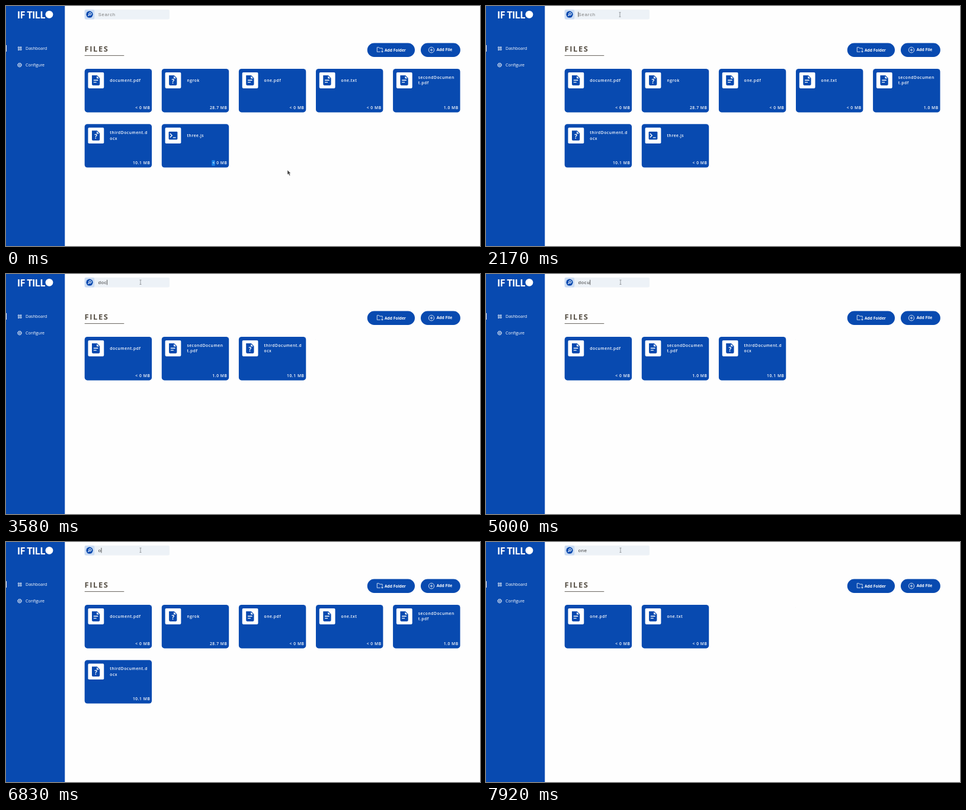
An HTML page for the animation above (8000 ms loop, 800 by 405 pixels).

```html
<!DOCTYPE html>
<html lang="en">
<head>
<meta charset="utf-8">
<title>Files</title>
<style>
  html, body { margin: 0; width: 100%; height: 100%; overflow: hidden; background: #fefefe; }
  svg { display: block; width: 100vw; height: 100vh; }
  text { font-family: "Open Sans", "Noto Sans", sans-serif; fill: #fff; white-space: pre; }
  .blue { fill: #084ab0; }
  .line { fill: none; stroke: #fff; stroke-width: .8; }
  .brand { font-size: 16.5px; font-weight: 700; font-stretch: 75%; letter-spacing: -.8px; }
  .nav { font-size: 7.05px; }
  .head { font-size: 13px; font-weight: 700; letter-spacing: 1.6px; fill: #575046; }
  .button { font-size: 6.7px; font-weight: 700; }
  .card { font-size: 6.65px; font-weight: 600; letter-spacing: .58px; }
  .size { text-anchor: end; }
  .mark { font-size: 10px; font-weight: 700; letter-spacing: 0; text-anchor: middle; }
  .field { font-family: "Liberation Sans", Arial, sans-serif; font-size: 7.7px; letter-spacing: .8px; }
</style>
</head>
<body>
<svg viewBox="0 0 800 405" preserveAspectRatio="none">
  <defs>
    <g id="page">
      <path class="blue" d="M6.5 5h8.7l4.6 4.6V20a1.8 1.8 0 0 1-1.8 1.8H8.3A1.8 1.8 0 0 1 6.5 20z"/>
      <path fill="#fff" d="M14.6 6.2v4h4z"/>
    </g>
    <g id="doc">
      <use href="#page"/>
      <path class="line" stroke-width="1.3" d="M9.3 13.2h7.6M9.3 16.5h4.9" style="stroke-width:1.4"/>
    </g>
    <g id="unknown">
      <use href="#page"/>
      <text class="mark" x="13.2" y="19.2">?</text>
    </g>
    <g id="code">
      <rect class="blue" x="6" y="6.6" width="14.8" height="13.6" rx="1.4"/>
      <path class="line" style="stroke-width:1.4" d="M8.4 10l3.2 3.2-3.2 3.2M13.2 16.8h4.8"/>
    </g>
  </defs>

  <rect width="800" height="405" fill="#fefefe"/>

  <rect class="blue" width="99.3" height="405"/>
  <text class="brand" x="18.8" y="20.7">IF TILL</text>
  <circle cx="73" cy="14.3" r="6.4" fill="#fff"/>
  <rect y="66" width="1" height="11" fill="#fff"/>
  <path class="line" d="M20.5 69h2v2.6h-2zM24 69h2v1.4h-2zM20.5 73.2h2v1.2h-2zM24 71.9h2v2.5h-2z"/>
  <text class="nav" x="33" y="74">Dashboard</text>
  <g class="line">
    <circle cx="23" cy="99.6" r="2.9"/>
    <circle cx="23" cy="99.6" r="1.1"/>
    <circle cx="23" cy="99.6" r="3.4" stroke-dasharray="1.3 1.37"/>
  </g>
  <text class="nav" x="33" y="102">Configure</text>

  <rect x="132.7" y="6" width="143.3" height="16.6" rx="2.5" fill="#edf2f7"/>
  <rect x="132.7" y="6" width="16.6" height="16.6" rx="2.5" fill="#cbdcf3"/>
  <circle class="blue" cx="141" cy="14.2" r="5.6"/>
  <circle class="line" cx="141.9" cy="13.3" r="2" style="stroke-width:1.1"/>
  <path class="line" d="M140.4 14.8l-2.1 2.1" style="stroke-width:1.2"/>
  <text class="field" id="query" x="155.7" y="17"></text>
  <rect id="caret" y="9.8" width=".8" height="8.6" fill="#333"/>

  <text class="head" x="132.4" y="77">FILES</text>
  <rect x="132.7" y="83.1" width="66.6" height="1" fill="#67625b"/>

  <rect class="blue" x="609.8" y="62.6" width="80.2" height="23.3" rx="11.6"/>
  <path class="line" d="M631.8 77.3h-5.5v-7.5h3.2l1 1.4h4.7v3.2M633.2 76.8h3.6M635 75v3.6"/>
  <text class="button" x="639" y="76.6">Add Folder</text>
  <rect class="blue" x="700" y="62.6" width="66.8" height="23.3" rx="11.6"/>
  <circle class="line" cx="718" cy="74.2" r="4.7"/>
  <path class="line" d="M715.5 74.2h5M718 71.7v5"/>
  <text class="button" x="726.7" y="76.4">Add File</text>

  <g id="cards"></g>

  <path id="arrow" d="M0 0v7.6l1.8-1.5 1.5 3.1 1.4-.7-1.4-3 2.2-.3z" fill="#444" stroke="#fff" stroke-width=".3"/>
  <path id="beam" d="M-1.5-3.7h3M0-3.7v7.4M-1.5 3.7h3" fill="none" stroke="#8b8f94" stroke-width=".9"/>
</svg>
<script>
const LOOP = 8000;
const $ = id => document.getElementById(id);

// name ("|" marks the line break), size, icon
const files = [
  ['document.pdf', '< 0 MB', 'doc'],
  ['ngrok', '28.7 MB', 'unknown'],
  ['one.pdf', '< 0 MB', 'doc'],
  ['one.txt', '< 0 MB', 'doc'],
  ['secondDocumen|t.pdf', '1.0 MB', 'doc'],
  ['thirdDocument.d|ocx', '10.1 MB', 'unknown'],
  ['three.js', '< 0 MB', 'code']
];

// time, query, caret shown
const typing = [
  [0, '', 0], [1580, '', 1], [2250, '', 0],
  [2830, 'd', 1], [3170, 'do', 1], [3580, 'doc', 1], [3830, 'docu', 1],
  [4500, 'docu', 0], [5000, 'docu', 1], [5420, 'doc', 1], [5580, 'do', 1],
  [5920, 'd', 1], [6000, 'd', 0], [6250, '', 1],
  [6830, 'o', 1], [7170, 'on', 1], [7330, 'one', 1], [7920, 'one', 0]
];

// time, x, y, pointer shape
const pointer = [
  [0, 475, 277, 'arrow'], [330, 560, 220, 'arrow'], [410, 690, 150, 'arrow'],
  [500, 757, 98, 'arrow'], [580, 695, 54, 'arrow'], [670, 560, 40, 'arrow'],
  [750, 410, 39, 'arrow'], [830, 270, 56, 'arrow'], [920, 176, 70, 'arrow'],
  [1000, 258, 50, 'arrow'], [1080, 470, 70, 'arrow'], [1170, 699, 104, 'arrow'],
  [1250, 590, 122, 'arrow'], [1330, 360, 64, 'arrow'], [1420, 223.6, 15.5, 'beam'],
  [1830, 0, 0, ''], [2000, 224.2, 15.5, 'beam'], [2080, 225, 15, 'beam'],
  [2170, 226, 14.5, 'beam'], [2250, 226.5, 14.2, 'beam'], [2420, 227, 13.8, 'beam']
];

const cards = files.map(([name, size, icon]) => {
  const g = document.createElementNS('http://www.w3.org/2000/svg', 'g');
  const lines = name.split('|');
  const first = lines.length > 1 ? 17.2 : 21.8;
  const selected = icon === 'code'
    ? '<rect class="selection" x="84.6" y="61" width="5.2" height="9.3" fill="#1b86ea"/>' : '';
  g.innerHTML = `
    <rect class="blue" width="113.4" height="73.4" rx="4.6"/>
    <rect x="5.8" y="6.1" width="26.8" height="26.8" rx="1.8" fill="#fff"/>
    <use href="#${icon}" x="5.8" y="6.1"/>${selected}
    ${lines.map((s, i) => `<text class="card" x="42.6" y="${first + i * 9.2}">${s}</text>`).join('')}
    <text class="card size" x="110.7" y="67.6">${size.replace('<', '&lt;')}</text>`;
  $('cards').append(g);
  return { g, key: name.replace('|', '').toLowerCase() };
});
const selection = document.querySelector('.selection');

const show = (el, on) => el.setAttribute('visibility', on ? 'visible' : 'hidden');
const move = (el, x, y) => el.setAttribute('transform', `translate(${x} ${y})`);
const at = (steps, t) => steps.findLast(s => s[0] <= t);

function draw(t) {
  const [, query, caret] = at(typing, t);
  const label = $('query');
  label.textContent = query || 'Search';
  label.style.fill = query ? '#333' : '#7b7b7b';
  $('caret').setAttribute('x', 155.5 + (query ? label.getComputedTextLength() : 0));
  show($('caret'), caret);

  let slot = 0;
  for (const { g, key } of cards) {
    const match = key.includes(query);
    g.style.display = match ? '' : 'none';
    if (!match) continue;
    move(g, 132.7 + slot % 5 * 130.1, 106 + Math.floor(slot / 5) * 93.2);
    slot++;
  }
  show(selection, t < 1580);

  const [, x, y, shape] = at(pointer, t);
  for (const id of ['arrow', 'beam']) {
    show($(id), id === shape);
    move($(id), x, y);
  }
}

const start = performance.now();
function tick() {
  draw((performance.now() - start) % LOOP);
  requestAnimationFrame(tick);
}
tick();
</script>
</body>
</html>
```
